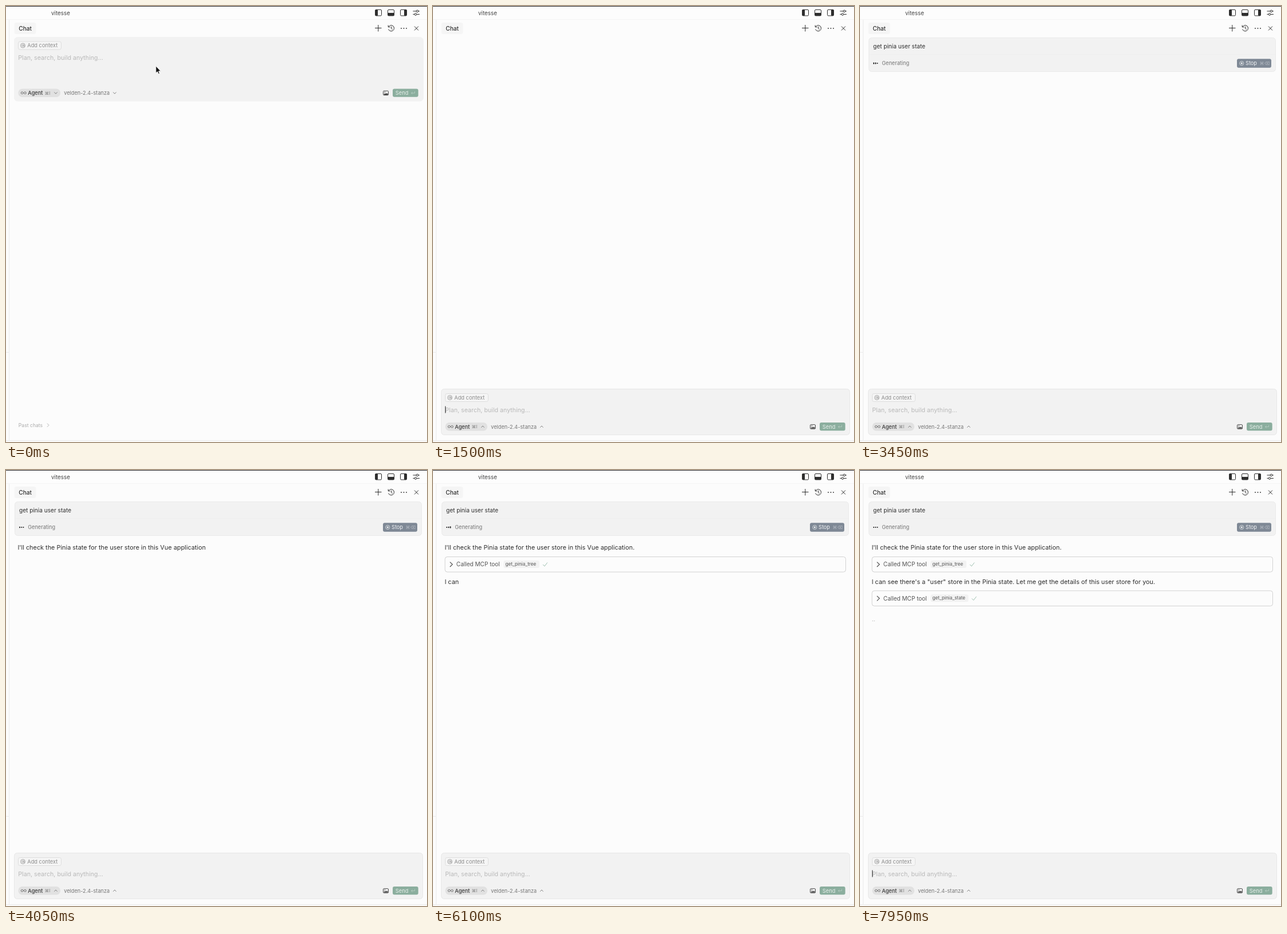
These frames come from a looping animation (736 by 761 pixels, 8 s). An HTML page:

```html
<!DOCTYPE html>
<html lang="en">
<head>
<meta charset="utf-8">
<title>Chat panel</title>
<style>
  html, body { margin: 0; width: 100%; height: 100%; overflow: hidden; background: #fcfcfc; }
  svg { display: block; width: 100%; height: 100%; font-family: Inter, "DejaVu Sans", sans-serif; }
  text { white-space: pre; }
</style>
</head>
<body>
<svg id="stage" viewBox="0 0 736 761"></svg>
<script>
const LOOP = 8000;
const INK = '#2e2e2e';
const PROMPT = 'get pinia user state';
const REPLY_1 = "I'll check the Pinia state for the user store in this Vue application.";
const REPLY_2 = 'I can see there\'s a "user" store in the Pinia state. Let me get the details of this user store for you.';

// Markup helpers
const text = (x, y, size, fill, str, extra = '') =>
  `<text x="${x}" y="${y}" font-size="${size}" fill="${fill}" ${extra}>${str}</text>`;
const rect = (x, y, w, h, r, fill, stroke = 'none') =>
  `<rect x="${x}" y="${y}" width="${w}" height="${h}" rx="${r}" fill="${fill}" stroke="${stroke}"/>`;
const line = (d, stroke, w = 1, extra = '') =>
  `<path d="${d}" fill="none" stroke="${stroke}" stroke-width="${w}" ${extra}/>`;
const circle = (x, y, r, fill, stroke = 'none', w = 1) =>
  `<circle cx="${x}" cy="${y}" r="${r}" fill="${fill}" stroke="${stroke}" stroke-width="${w}"/>`;
const group = (id, inner, extra = '') => `<g id="${id}" ${extra}>${inner}</g>`;

const panelIcon = (x, filled) => rect(x + .5, 6.5, 11, 10.5, 1.5, 'none', INK) + filled;

function frame() {
  return rect(0, 0, 736, 761, 0, '#fcfcfc')
    + rect(0, 0, 736, 23, 0, '#fdfdfd')
    + rect(0, 0, 736, 1, 0, '#2b2b2e')
    + line('M0 23.5H736', '#f5f5f5')
    + line('M5.5 24V758M0 604.5H5M0 758.5H736', '#ebebeb')
    + text(79, 15.6, 9.9, '#444', 'vitesse')
    + panelIcon(645, rect(645.5, 6.5, 4.5, 10.5, 1, INK))
    + panelIcon(667, rect(667.5, 12, 11, 5, 1, INK))
    + panelIcon(689, rect(696, 6.5, 4.5, 10.5, 1, INK))
    + line('M711.5 9H717M721 9H723M711.5 14.5H714M718 14.5H723', INK)
    + circle(719, 9, 1.8, 'none', INK) + circle(716, 14.5, 1.8, 'none', INK)
    + rect(14.5, 29, 38, 20, 4, '#f5f5f5')
    + text(22.3, 42.6, 10.1, INK, 'Chat', 'font-weight="500"')
    + line('M645 38.5H656.5M650.75 33V44.5', INK)
    + line('M669 36.2A5.1 5.1 0 1 1 668.6 40.5M668.2 33.5V36.8H671.5M673.5 35.8V39.2L675.8 41', INK)
    + [691, 695.5, 700].map(x => circle(x, 39, .9, INK)).join('')
    + line('M714 35.5L721 42.5M721 35.5L714 42.5', INK);
}

function composer() {
  const gray = '#8b8b8b';
  const head = rect(21.5, 62, 75, 14, 3, '#f5f5f5', '#dedede')
    + circle(29.5, 69, 3.9, 'none', gray, .8) + circle(29.5, 69, 1.6, 'none', gray, .8)
    + line('M31.1 67.4V69.6Q31.7 71 33 70', gray, .7)
    + text(37.3, 72.3, 9.25, gray, 'Add context')
    + text(21.3, 94, 10.7, '#b9b9b9', 'Plan, search, build anything...', 'id="hint"')
    + text(21.3, 94, 10.7, INK, '', 'id="draft"')
    + '<rect id="caret" x="21" y="84" width="1" height="12" fill="#222"/>';
  const foot = rect(21.5, 144.5, 73.5, 14.5, 7, '#e1e1e1')
    + line('M30.7 151.7C29 149.3 26.3 149.4 26.3 151.7S29 154.1 30.7 151.7S35.1 149.4 35.1 151.7S32.4 154.1 30.7 151.7', '#555', .9)
    + text(38.2, 155, 9.2, '#3c3c3c', 'Agent', 'font-weight="500"')
    + text(67.8, 154.6, 7.4, '#777', '⌘I')
    + text(101.2, 155, 9.2, '#777', 'velden-2.4-stanza')
    + line('', '#777', .9, 'id="arrows"')
    + rect(659.5, 148.2, 9, 7.4, 1.2, 'none', '#444')
    + '<path d="M660 155L662.6 152L664.3 153.6L666 151.4L668.3 155Z" fill="#444"/>'
    + circle(662.3, 150.4, .8, '#444')
    + '<rect id="send" x="676" y="144.5" width="44.7" height="14.3" rx="3"/>'
    + text(680.8, 155, 9.3, '#e6efea', 'Send')
    + line('M714.5 149V152H708.5M710.5 150L708.5 152L710.5 154', '#b9d0c5', .8);
  return '<rect id="card" x="14.5"/>' + group('head', head) + group('foot', foot);
}

function message() {
  return rect(15.5, 55.5, 711, 59, 5, '#f2f2f2', '#eaeaea')
    + line('M16 84.5H726', '#efefef')
    + text(23, 73.6, 10.1, INK, PROMPT)
    + [0, 1, 2].map(i => `<rect class="bar" x="${23 + i * 3.2}" width="2" rx=".8" fill="${INK}"/>`).join('')
    + text(38.2, 103.4, 9.2, '#757575', 'Generating')
    + rect(659, 92.2, 60, 15.6, 3, '#7e8895')
    + circle(667.3, 100, 3.6, 'none', '#e4e7ea', .8) + rect(665.9, 98.6, 2.8, 2.8, .6, '#e4e7ea')
    + text(674, 103.4, 9.2, '#f1f3f5', 'Stop')
    + text(698.6, 103, 8, '#b4bac2', '⌘⌫');
}

function tool(id, y, name, tagWidth) {
  const end = 123.5 + tagWidth;
  return group(id,
    rect(21, .5, 700.5, 26.5, 4, '#fcfcfc', '#d2d2d2')
    + line('M29.7 9.6L34 13.8L29.7 18', '#444', 1.1)
    + text(40.8, 17.3, 10.05, '#555', 'Called MCP tool')
    + rect(123.5, 7, tagWidth, 13, 3, '#f2f2f2')
    + text(126.5, 16.2, 8.2, '#555', name)
    + line(`M${end + 6} 14L${end + 9} 17L${end + 14} 10.5`, '#9fc1b1', 1, `id="${id}Check"`),
    `transform="translate(0 ${y})"`);
}

const stage = document.getElementById('stage');
stage.innerHTML = frame()
  + group('past', text(21.8, 734.7, 8.65, '#ababab', 'Past chats') + line('M72 728.6L75 731.6L72 734.6', '#ababab', .9))
  + group('message', message())
  + text(20.4, 138.6, 10.88, INK, '', 'id="reply1"')
  + tool('tool1', 151, 'get_pinia_tree', 62.5)
  + text(20.4, 198.5, 10.88, INK, '', 'id="reply2"')
  + tool('tool2', 210.3, 'get_pinia_state', 66)
  + text(20.8, 0, 10, '#aaa', '', 'id="wait"')
  + group('composer', composer())
  + '<path id="pointer" d="M262 104.8V117L264.8 114.5L266.6 118.6L268.5 117.8L266.8 113.8H270.4Z" fill="#111" stroke="#fff" stroke-width=".8"/>';

const el = {};
stage.querySelectorAll('[id]').forEach(n => el[n.id] = n);
const bars = [...stage.querySelectorAll('.bar')];

const show = (n, on) => n.setAttribute('visibility', on ? 'inherit' : 'hidden');
const attrs = (n, o) => { for (const k in o) n.setAttribute(k, o[k]); };
const put = (n, s) => { if (n.textContent !== s) n.textContent = s; };

// Reveals a reply token by token
const stream = (str, t, start, step) => t < start ? '' :
  str.match(/ ?["'\w]+|\./g).slice(0, Math.floor((t - start) / step) + 1).join('');

function render(t) {
  const docked = t >= 1350;
  const chars = docked ? 0 : Math.max(0, Math.min(PROMPT.length, Math.floor((t - 100) / 53)));

  // Composer
  attrs(el.card, docked
    ? { y: 668.5, width: 714, height: 80, rx: 5, fill: '#f2f2f2', stroke: '#e7e7e7' }
    : { y: 54.5, width: 715, height: 111.5, rx: 6, fill: '#f2f2f2', stroke: '#f2f2f2' });
  el.head.setAttribute('transform', `translate(0 ${docked ? 614.5 : 0})`);
  el.foot.setAttribute('transform', `translate(0 ${docked ? 582.5 : 0})`);
  el.arrows.setAttribute('d', docked
    ? 'M84.3 153.2L87 150.4L89.7 153.2M187.3 153.2L190 150.4L192.7 153.2'
    : 'M84.3 150.4L87 153.2L89.7 150.4M187.3 150.4L190 153.2L192.7 150.4');
  el.send.setAttribute('fill', chars ? '#3c7c60' : '#8bae9e');
  show(el.hint, !chars);
  put(el.draft, PROMPT.slice(0, chars));
  el.caret.setAttribute('x', 21.2 + (chars ? el.draft.getComputedTextLength() : 0));
  show(el.caret, chars > 0 || t % 1000 >= 500);
  show(el.pointer, t < 100);
  show(el.past, !docked);

  // Conversation
  show(el.message, t >= 1600);
  bars.forEach((b, i) => {
    const h = 2.2 + 1.1 * Math.max(0, Math.sin(2 * Math.PI * (t / 800 - i / 5)));
    attrs(b, { y: 100 - h / 2, height: h });
  });
  put(el.reply1, stream(REPLY_1, t, 3890, 12.5));
  show(el.tool1, t >= 4300);
  show(el.tool1Check, t >= 4600);
  put(el.reply2, stream(REPLY_2, t, 6030, 42));
  show(el.tool2, t >= 7150);
  show(el.tool2Check, t >= 7300);

  // Waiting dots below the last tool call
  const second = t >= 7350;
  const waiting = second || (t >= 4700 && t < 6000);
  const dots = 1 + Math.floor((t - (second ? 7350 : 4700)) / 400) % 3;
  put(el.wait, waiting ? '.'.repeat(dots) : '');
  el.wait.setAttribute('y', second ? 263.5 : 204);
}

const t0 = performance.now();
function tick() {
  render((performance.now() - t0) % LOOP);
  requestAnimationFrame(tick);
}
render(0);
requestAnimationFrame(tick);
</script>
</body>
</html>
```
